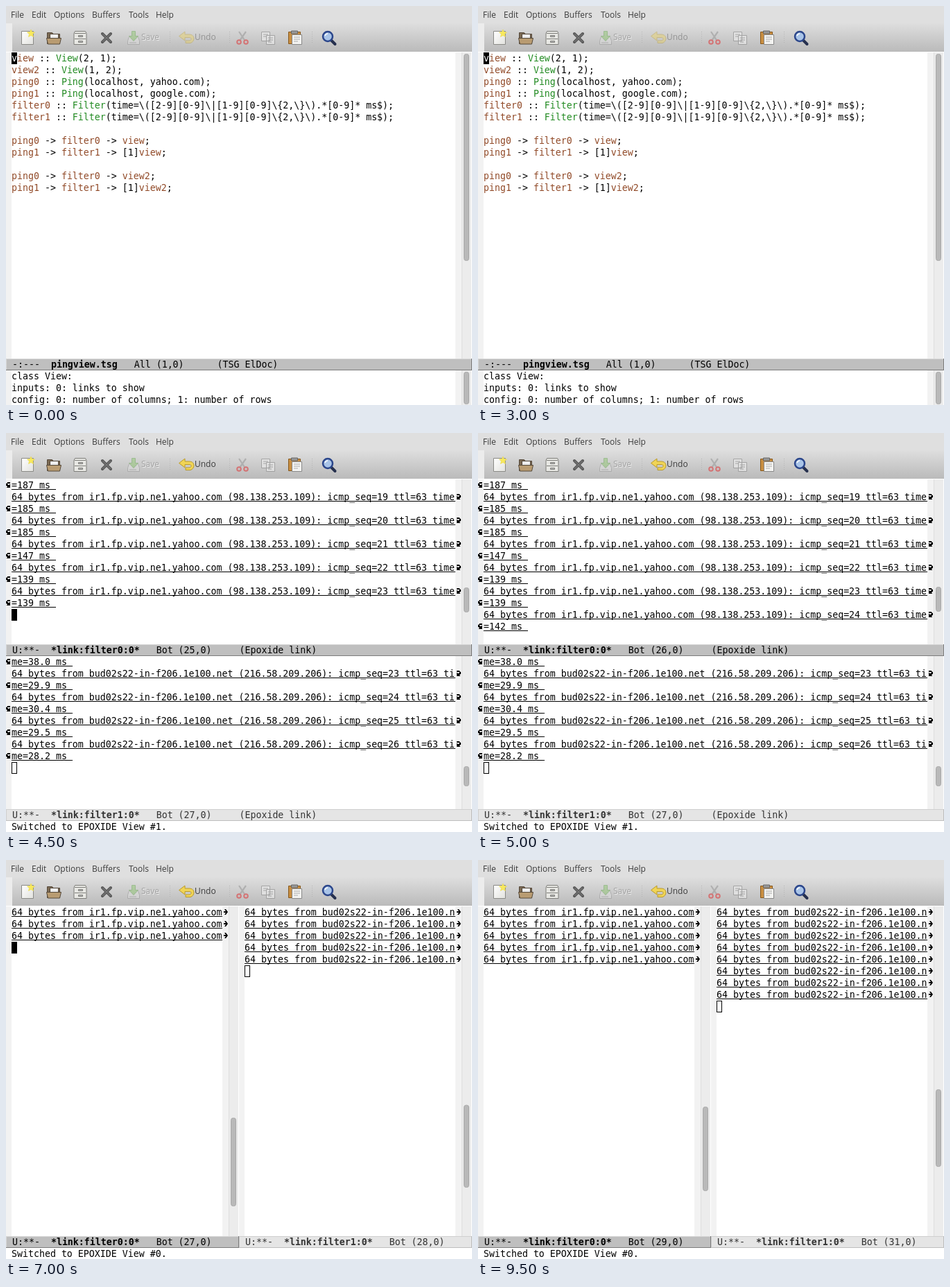
Recreate the animation shown at these times as an HTML page. Size 672x576 px, loop 10 s.

```html
<!DOCTYPE html>
<html lang="en">
<head>
<meta charset="utf-8">
<title>Editor session</title>
<style>
html, body { margin: 0; width: 100%; height: 100%; overflow: hidden; background: #fff; }
svg { display: block; }
text { white-space: pre; font: 13.289px "DejaVu Sans Mono", monospace; font-variant-ligatures: none; }
.ui { font: 12px "Open Sans", "Noto Sans", sans-serif; fill: #3c3c3c; }
.b { font-weight: bold; }
.var { fill: #914a28; }
.type { fill: #228b22; }
.off { opacity: .4; }
</style>
</head>
<body>
<svg width="672" height="576" viewBox="0 0 672 576">
  <defs>
    <linearGradient id="bar" x2="0" y2="1">
      <stop stop-color="#dedede"/><stop offset="1" stop-color="#bababa"/>
    </linearGradient>
    <linearGradient id="paper" x2="1" y2="1">
      <stop stop-color="#fff"/><stop offset="1" stop-color="#e2e2de"/>
    </linearGradient>
    <path id="cut" d="M2 3h3L3 0h2l3 4-3 4H3l2-3H2z"/>
    <path id="wrap" d="M2 0H6V2H2V3H3V4H5V3H6V8H1V7H2V6H1V5H0V2H1V1H2Z"/>
  </defs>
  <rect width="672" height="26" fill="#dfdfdf"/>
  <rect y="25" width="672" height="41" fill="url(#bar)"/>
  <rect y="25" width="9" height="41" fill="#ececec"/>
  <g id="menu"></g>

  <g stroke="#8a8a86" fill="url(#paper)">
    <path d="M22.500 36.500H39.500V55.500H22.500z"/>
    <path d="M36 34l1.500 3.500 4 .5-3 2.500 1 4-3.500-2-3.500 2 1-4-3-2.500 4-.5z" fill="#f8e95c" stroke="#e9d84a" stroke-width=".6"/>
  </g>
  <g stroke="#54483a">
    <path d="M59.500 38.500h7l2 2h9v14h-18z" fill="#7b6a54"/>
    <path d="M63.500 40.500h12v9h-12z" fill="#eee"/>
    <path d="M58.500 46.500h21l-2 8.500h-17z" fill="#b99c72"/>
  </g>
  <g stroke="#7d7d79" fill="#e8e8e4">
    <path d="M99.500 36.500h15l1.500 3v16h-18v-16z"/>
    <path d="M99 39.500h16M99 47.500h16" fill="none"/>
    <path d="M104.500 42.500h6v2h-6zM104.500 50.500h6v2h-6z" fill="#bbb"/>
  </g>
  <path d="M139 40L151 52M151 40L139 52" stroke="#555" stroke-width="4" stroke-linecap="round"/>
  <path d="M139 40L151 52M151 40L139 52" stroke="#777" stroke-width="1.500"/>
  <g class="off">
    <path d="M177.500 44.500h13l2 6v5h-17v-5z" fill="#e6e6e6" stroke="#888"/>
    <path d="M181.500 36.500h5v7h4l-6.500 7-6.500-7h4z" fill="#7fc45a" stroke="#4b9a30"/>
    <path d="M178 53h10" stroke="#888"/>
  </g>
  <text class="ui" x="196" y="50" style="fill:#eee">Save</text>
  <text class="ui" x="195" y="49" style="fill:#a3a3a3">Save</text>
  <g id="undo">
    <path d="M249.500 43.500L258 37v4h6c5 0 7 3 7 6s-2 5.500-5 6.500h-7v-3.500h5c2 0 3-1 3-2.500s-1-2-3-2h-6v4.500z" fill="#f0d456" stroke="#b99a2a"/>
    <text class="ui" x="272" y="49">Undo</text>
  </g>
  <path d="M236.500 37v18M322.500 37v18M441.500 37v18" stroke="#b4b4b4" stroke-dasharray="1 2"/>
  <g fill="none" opacity=".75">
    <path d="M336 37L344.500 50M346 37L337 50" stroke="#a5a5a5" stroke-width="2.200"/>
    <circle cx="336" cy="52" r="2.800" stroke="#d8595a" stroke-width="2"/>
    <circle cx="346" cy="52" r="2.800" stroke="#d8595a" stroke-width="2"/>
  </g>
  <g fill="#eee" stroke="#888" opacity=".6">
    <path d="M368.500 37.500h12v13h-12zM375.500 42.500h12v13h-12z"/>
    <path d="M371 41h7M371 44h4M378 46h7M378 49h7M378 52h5"/>
  </g>
  <path d="M407.500 37.500h17v17h-17z" fill="#c98f42" stroke="#86581c"/>
  <path d="M411.500 36h9v4h-9z" fill="#999" stroke="#666"/>
  <path d="M412.500 41.500h14v14h-14z" fill="#f3f3f1" stroke="#888"/>
  <path d="M415 45h9M415 48h9M415 51h6" stroke="#aaa"/>
  <path d="M469 49.500l5.500 5.500" stroke="#26304e" stroke-width="4" stroke-linecap="round"/>
  <circle cx="464" cy="44" r="7" fill="#a9c4e8" stroke="#2b468b" stroke-width="2.500"/>
  <path d="M460 43q1-3 4-3" fill="none" stroke="#fff" stroke-width="1.500"/>

  <g id="view"></g>
</svg>
<script>
const $ = id => document.getElementById(id);
const TOP = 67, ROW = 17, COL = 8, TICK = 500, TICKS = 20;

const code = String.raw`view :: View(2, 1);
view2 :: View(1, 2);
ping0 :: Ping(localhost, yahoo.com);
ping1 :: Ping(localhost, google.com);
filter0 :: Filter(time=\([2-9][0-9]\|[1-9][0-9]\{2,\}\).*[0-9]* ms$);
filter1 :: Filter(time=\([2-9][0-9]\|[1-9][0-9]\{2,\}\).*[0-9]* ms$);

ping0 -> filter0 -> view;
ping1 -> filter1 -> [1]view;

ping0 -> filter0 -> view2;
ping1 -> filter1 -> [1]view2;`.split("\n");
const help = ["class View:", "inputs: 0: links to show",
  "config: 0: number of columns; 1: number of rows"];

// Each link: host, its round-trip times from sequence number `first`,
// and the latest sequence number at every tick from FIRST_TICK on.
const FIRST_TICK = 8, SPLIT_TICK = 14;
const links = [
  { host: "ir1.fp.vip.ne1.yahoo.com (98.138.253.109)", first: 18, lead: 2,
    times: [187, 185, 185, 147, 139, 139, 142, 135],
    seq: [22, 23, 24, 24, 25, 25, 25, 25, 25, 26, 26, 27] },
  { host: "bud02s22-in-f206.1e100.net (216.58.209.206)", first: 22, lead: 1,
    times: ["38.0", "29.9", "30.4", "29.5", "28.2"],
    seq: [25, 26, 26, 26, 26, 26, 27, 27, 28, 29, 29, 30] }
];

const y = row => TOP + row * ROW;
const rect = (x, y, w, h, fill, more = "") =>
  `<rect x="${x}" y="${y}" width="${w}" height="${h}" fill="${fill}" ${more}/>`;
const text = (x, row, s, cls = "") =>
  `<text x="${x}" y="${y(row) + 13}" class="${cls}">${s}</text>`;
const underlined = (x, row, s) =>
  text(x, row, s) + rect(x, y(row) + 14, s.length * COL, 1, "#000");
const mark = (id, x, row, flip = 1) =>
  `<use href="#${id}" transform="translate(${x} ${y(row) + 4}) scale(${flip} 1)"/>`;
const block = (x, row) => rect(x, y(row), COL, ROW, "#000");
const hollow = (x, row) =>
  rect(x + .5, y(row) + .5, COL - 1, ROW - 1, "none", 'stroke="#000"');
const thumb = (right, from, to) =>
  rect(right - 11.5, from + .5, 7, to - from - 1, "#b9b9b9", 'rx="3" stroke="#a9a9a9"');

function pane(x, w, row, rows) {
  const top = y(row), h = rows * ROW, right = x + w;
  return rect(x, top, COL, h, "#f2f2f2") + rect(right - 24, top, 9, h, "#f2f2f2") +
    rect(right - 15, top, 14, h, "#ececec") + rect(right - 15, top, 1, h, "#dedede");
}

function modeLine(x, w, row, active, flags, name, rest) {
  const [bg, light, dark, ink] = active
    ? ["#bfbfbf", "#d6d6d6", "#7c7c7c", "#000"]
    : ["#e5e5e5", "#cfcfcf", "#bdbdbd", "#333"];
  const top = y(row);
  return rect(x, top, w, ROW, dark) + rect(x, top, w - 1, ROW - 1, light) +
    rect(x + 1, top + 1, w - 2, ROW - 2, bg) + `<g fill="${ink}">` +
    text(x + 9, row, `${flags}  <tspan class="b">${name}</tspan>   ${rest}`) + "</g>";
}

const linkLine = (i, seq, x, w, row, mode = "") =>
  modeLine(x, w, row, i === 0, "U:**-", `*link:filter${i}:0*`,
    `Bot (${seq + links[i].lead},0)${mode}`);

const paint = line => line
  .replace(/\b(view2?|ping\d|filter\d)\b/g, "<tspan class=var>$1</tspan>")
  .replace(/\b(View|Ping|Filter)\b/g, "<tspan class=type>$1</tspan>");

function editor(on) {
  return pane(0, 672, 0, 26) + thumb(672, 69, 368) +
    code.map((line, i) => text(8, i, paint(line))).join("") +
    (on ? block(8, 0) + `<g fill="#fff">${text(8, 0, "v")}</g>` : "") +
    modeLine(0, 672, 26, true, "-:---", "pingview.tsg", "All (1,0)      (TSG ElDoc)") +
    pane(0, 672, 27, 3) + thumb(672, 528, 575) +
    help.map((line, i) => text(8, 27 + i, line)).join("");
}

// Long lines wrap at 80 columns; `start` is the reply whose tail opens the window.
function wrapped(i, seq, start, row, on) {
  const { host, first, times } = links[i];
  let out = "";
  for (let n = start; n <= seq; n++) {
    const line = `64 bytes from ${host}: icmp_seq=${n} ttl=63 time=${times[n - first]} ms `;
    if (n > start) {
      out += underlined(8, row, line.slice(0, 80)) + mark("wrap", 656, row, -1);
      row++;
    }
    out += underlined(8, row, line.slice(80)) + mark("wrap", 0, row);
    row++;
  }
  return out + (i ? hollow(8, row) : on ? block(8, row) : "");
}

// The upper window recentres once its cursor would leave the bottom.
function stacked(a, b, on) {
  const [start, top] = a < 25 ? [18, 246 - a] : [22, 243];
  return pane(0, 672, 0, 14) + pane(0, 672, 15, 13) +
    wrapped(0, a, start, 0, on) + wrapped(1, b, 22, 15) +
    thumb(672, top, top + 36) + thumb(672, 481, 510) +
    linkLine(0, a, 0, 672, 14, "     (Epoxide link)") +
    linkLine(1, b, 0, 672, 28, "     (Epoxide link)") +
    text(8, 29, "Switched to EPOXIDE View #1.");
}

function truncated(i, seq, on) {
  const x = i * 336, line = `64 bytes from ${links[i].host}`.slice(0, 38);
  const rows = seq - 22;
  let out = pane(x, 336, 0, 28);
  for (let r = 0; r < rows; r++)
    out += underlined(x + 8, r, line) + mark("cut", x + 312, r);
  out += i ? hollow(x + 8, rows) : on ? block(x + 8, rows) : "";
  out += i ? thumb(672, 346 - 7.5 * (seq - 28), 463 - 10 * (seq - 28))
           : thumb(336, 372 - 8 * (seq - 25), 500 - 11 * (seq - 25));
  return out + linkLine(i, seq, x, 336, 28);
}

function render(tick) {
  const even = tick % 2 === 0, [a, b] = links.map(l => l.seq[tick - FIRST_TICK]);
  $("undo").setAttribute("class", tick < FIRST_TICK ? "off" : "");
  $("view").innerHTML =
    tick < FIRST_TICK ? editor(even) :
    tick < SPLIT_TICK ? stacked(a, b, !even || tick === FIRST_TICK) :
    truncated(0, a, even) + truncated(1, b) + text(8, 29, "Switched to EPOXIDE View #0.");
}

$("menu").innerHTML = [["File", 7], ["Edit", 37], ["Options", 69], ["Buffers", 124],
  ["Tools", 177], ["Help", 216]]
  .map(([s, x]) => `<text class="ui" x="${x}" y="17">${s}</text>`).join("");

let start, shown;
function step(now) {
  start ??= now;
  const tick = Math.floor((now - start) / TICK) % TICKS;
  if (tick !== shown) render(shown = tick);
  requestAnimationFrame(step);
}
render(shown = 0);
requestAnimationFrame(step);
</script>
</body>
</html>
```
